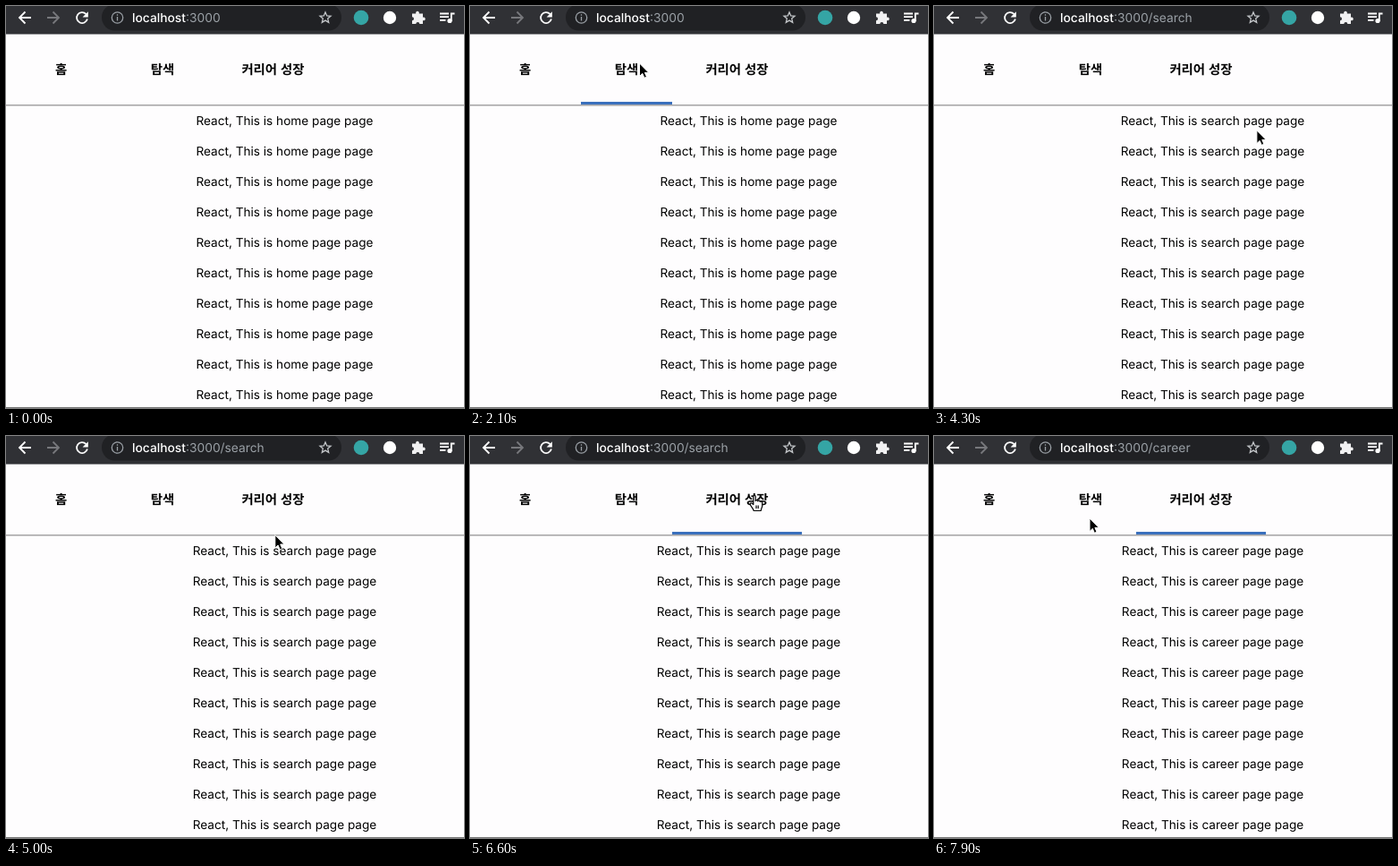
Recreate the animation shown at these times as an HTML page. Size 512 by 449 pixels, loop 8000 ms.

```html
<!DOCTYPE html>
<html lang="ko">
<head>
<meta charset="utf-8">
<style>
  html, body { margin: 0; height: 100%; overflow: hidden; background: #fefdfe; }
  svg { display: block; }
  text { font-family: Inter, "Noto Sans", sans-serif; text-rendering: geometricPrecision; }
  #lines text { font-size: 13.6px; text-anchor: middle; }
  #nav text { font: 700 14.4px "Noto Sans CJK KR", "Noto Sans CJK", sans-serif; text-anchor: middle; }
  .url { font-size: 13.8px; fill: #9aa0a6; }
  .host { fill: #fff; font-weight: 500; }
  .icon { fill: none; stroke: #fff; stroke-width: 1.8; }
  .dim { stroke: #9aa0a6; stroke-width: 1.3; }
</style>
</head>
<body>
<svg width="512" height="449" viewBox="0 0 512 449">
  <rect width="512" height="31.5" fill="#303135"/>
  <rect x="107" y="-2" width="268" height="29.5" rx="14.7" fill="#202124"/>
  <path class="icon" d="M28 13H15.5M21.5 6.5 15 13l6.5 6.5"/>
  <path class="icon" style="stroke:#77787c" d="M46 13H58.5M52.5 6.5 59 13l-6.5 6.5"/>
  <g transform="translate(85 13)">
    <path class="icon" d="M4.5-4A6 6 0 1 0 5.9 1.5"/>
    <path fill="#fff" d="M6.8-6.8V-.6H.6z"/>
  </g>
  <circle class="icon dim" cx="124.5" cy="13" r="6.2"/>
  <path class="icon dim" d="M124.5 9.3v1.5M124.5 12v4.5"/>
  <text class="url" x="141" y="18"><tspan class="host">localhost</tspan>:3000<tspan id="route"></tspan></text>
  <path class="icon" style="stroke:#c4c7ca;stroke-width:1.3" transform="translate(357 13)"
    d="M0-6 1.7-2 6-1.7 2.7 1.1 3.7 5.3 0 3.1-3.7 5.3-2.7 1.1-6-1.7-1.7-2z"/>
  <circle cx="397" cy="13" r="8.3" fill="#35a5a5"/>
  <circle cx="429" cy="13" r="7.2" fill="#fff"/>
  <path fill="#f1f1f2" d="M454 8.5h4.3a1.9 1.9 0 1 1 3.4 0H466v4.200a1.900 1.900 0 1 1 0 3.400V20h-3.700a2 2 0 1 0-4 0H454v-3.700a2 2 0 1 0 0-4z"/>
  <path class="icon" d="M485 8.5h10M485 12.2h10M485 15.9h6.5M497.800 17V8.500h3.700"/>
  <circle cx="496" cy="16.5" r="2.6" fill="#fff"/>

  <rect y="110" width="512" height="1.6" fill="#a9a8a9"/>
  <rect y="448" width="512" height="1" fill="#777"/>
  <g id="nav"></g>
  <rect id="bar" y="107" height="3" fill="#3a70bd"/>
  <g id="lines"></g>

  <g id="cursor">
    <path id="arrow" fill="#000" stroke="#fff" d="M0 0V14.5L3.3 11.4 5.4 16.3 8 15.2 5.9 10.4H10.3z"/>
    <path id="hand" fill="#fff" stroke="#000" stroke-width="1.2" stroke-linejoin="round"
      d="M-1.2 10.5V1.6C-1.2 0 1.2 0 1.2 1.6V6.5C1.4 5.3 3.6 5.4 3.7 6.8 4.2 5.8 6.2 6 6.3 7.4 7 6.7 8.7 7 8.7 8.5V12C8.7 14 7.6 14.5 7.2 17.5H-.8C-1 15.5-3.5 13.2-4.6 11-5.6 9-3.4 8.2-2.4 9.6zM2 11.5v3.5M4.2 11.5v3.5"/>
  </g>
</svg>
<script>
const LOOP = 8000, STEP = 100, PADDING = 37, HOVER_LAG = 2;
const $ = id => document.getElementById(id);

function add(parent, tag, attributes, text = "") {
  const node = document.createElementNS("http://www.w3.org/2000/svg", tag);
  for (const name in attributes) node.setAttribute(name, attributes[name]);
  node.textContent = text;
  if (parent) parent.append(node);
  return node;
}

const labels = [
  { text: "홈", left: 54, right: 69 },
  { text: "탐색", left: 161, right: 189 },
  { text: "커리어 성장", left: 263, right: 334 }
];
for (const { text, left, right } of labels)
  add($("nav"), "text", { x: (left + right) / 2, y: 75.6 }, text);

const lines = Array.from({ length: 10 }, (_, i) =>
  add($("lines"), "text", { x: 311.5, y: 133 + 34 * i }));

// Pointer strokes: first step, last step, curve
const strokes = [
  [1, 2, "M396 5L390 8"],
  [3, 10, "M390 8C330 390 20 390 57 65"],
  [14, 21, "M57 65C30 22 100 22 189.5 64"],
  [25, 26, "M189.5 64L186 72"],
  [32, 41, "M186 72C330-50 420 10 371 145"],
  [42, 47, "M370 140Q270 130 300 120"],
  [48, 57, "M300 120Q306 47 308 122"],
  [57, 63, "M308 122C308 220 325-20 318 57"],
  [64, 66, "M318 57V66"],
  [69, 75, "M318 66Q330 120 268 114"],
  [76, 79, "M268 114L174 92"]
].map(([start, end, d]) => ({ start, end, curve: add(null, "path", { d }) }));

function pointer(step) {
  const stroke = strokes.findLast(({ start }) => start <= step);
  if (!stroke) return { x: -50, y: -50 };
  const k = Math.min(1, (step - stroke.start) / (stroke.end - stroke.start));
  const eased = k * k * (3 - 2 * k);
  return stroke.curve.getPointAtLength(eased * stroke.curve.getTotalLength());
}

const labelAt = ({ x, y }, pad, top, bottom) => y > top && y < bottom &&
  labels.find(({ left, right }) => x >= left - pad && x < right + pad);

let shownPage;
function showPage(page) {
  if (page === shownPage) return;
  shownPage = page;
  $("route").textContent = page === "home" ? "" : "/" + page;
  for (const line of lines) line.textContent = `React, This is ${page} page page`;
}

function draw() {
  const step = Math.floor(performance.now() % LOOP / STEP);
  showPage(step < 29 ? "home" : step < 69 ? "search" : "career");

  const tip = pointer(step);
  const isHand = labelAt(tip, 0, 61, 80);
  $("cursor").setAttribute("transform", `translate(${tip.x} ${tip.y})`);
  $("hand").style.display = isHand ? "" : "none";
  $("arrow").style.display = isHand ? "none" : "";

  // The bar trails the pointer; the home tab has none
  const tab = labelAt(pointer(step - HOVER_LAG), PADDING, 31, 110);
  const hasBar = tab && tab !== labels[0];
  $("bar").setAttribute("x", hasBar ? tab.left - PADDING : 0);
  $("bar").setAttribute("width", hasBar ? tab.right - tab.left + 2 * PADDING : 0);
  requestAnimationFrame(draw);
}
draw();
</script>
</body>
</html>
```
